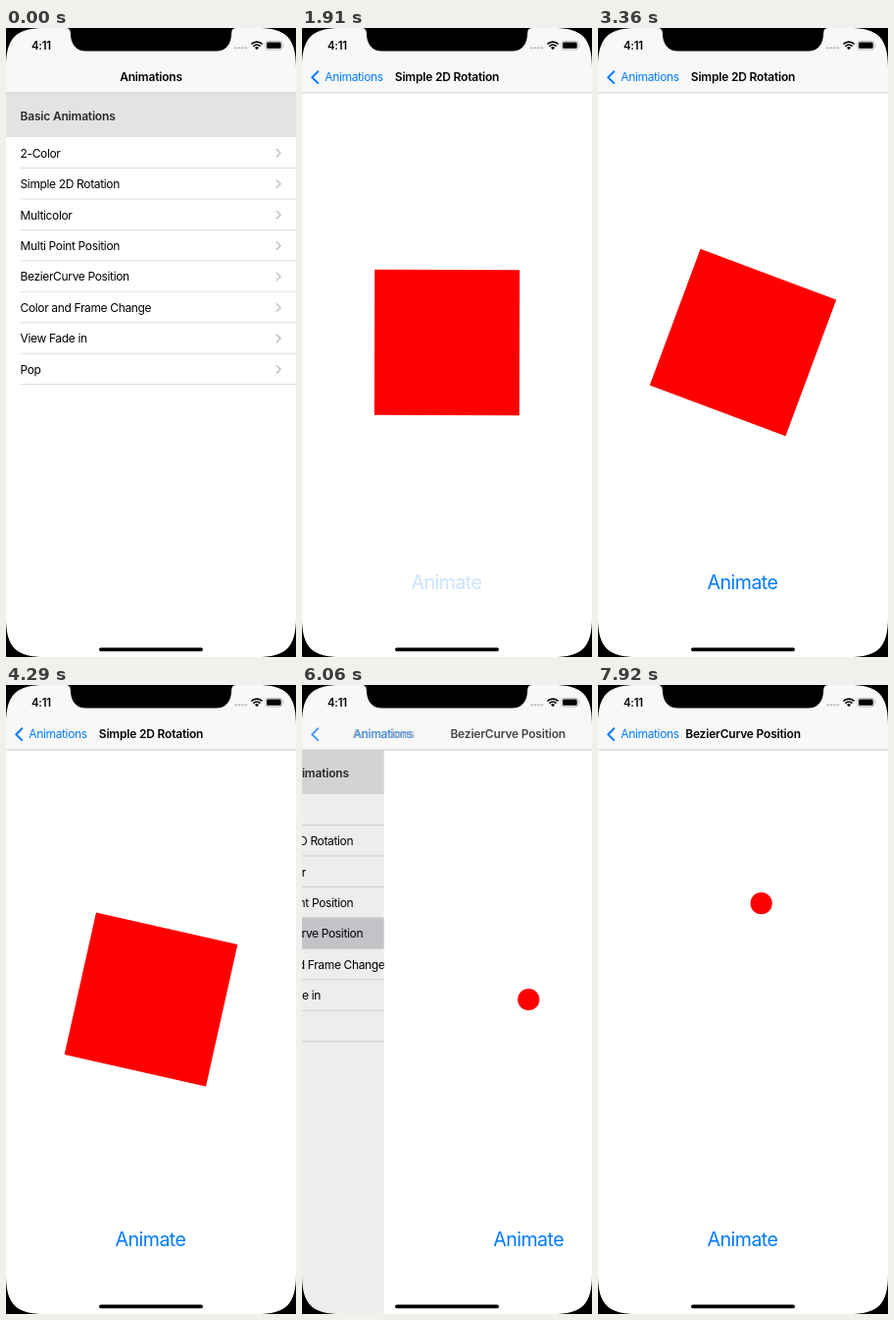
These frames come from a looping animation (296 by 640 pixels, 7990 ms). An HTML page:

```html
<!DOCTYPE html>
<html lang="en">
<head>
<meta charset="utf-8">
<title>Animations</title>
<style>
  html, body { margin: 0; width: 100%; height: 100%; overflow: hidden; background: #fff; }
  svg { display: block; width: 100vw; height: 100vh; }
  text { font: 12px Inter, Roboto, sans-serif; letter-spacing: -.35px; }
  .bold { font-weight: 600; letter-spacing: -.19px; }
  .mid { text-anchor: middle; }
  .blue { fill: #007aff; }
  .stroke { fill: none; stroke-linecap: round; stroke-linejoin: round; }
  #button { font-size: 19.6px; letter-spacing: -.55px; }
  #clock { font-size: 11.3px; }
</style>
</head>
<body>
<svg viewBox="0 0 296 640">
  <rect width="296" height="640" fill="#fff"/>
  <g id="list">
    <rect id="highlight" width="296" height="31.45" fill="#d1d1d6"/>
    <g id="rows"></g>
    <rect y="66" width="296" height="45" fill="#e3e3e3"/>
    <text class="bold" x="14.5" y="93.5" fill="#2b2b2b">Basic Animations</text>
  </g>
  <rect id="dim" width="296" height="640"/>
  <g id="page">
    <rect width="296" height="640" fill="#fff"/>
    <rect id="square" x="74" y="246" width="148" height="148" fill="red"/>
    <circle id="ball" r="11.1" fill="red"/>
    <text id="button" class="mid blue" x="147.5" y="571">Animate</text>
  </g>
  <rect width="296" height="66" fill="#f8f8f8"/>
  <rect y="65.5" width="296" height="1" fill="#d0d0d0"/>
  <text id="home" class="bold mid" y="54.3">Animations</text>
  <text id="back" class="mid blue" y="54.3">Animations</text>
  <path id="arrow" class="stroke" d="M16.3 44.3L10.3 50.2L16.3 56.1" stroke="#007aff" stroke-width="2"/>
  <text id="title" class="bold mid" y="54.3"></text>

  <text id="clock" class="bold" x="26" y="22">4:11</text>
  <g fill="#c4c4c4">
    <circle cx="234.5" cy="20.3" r="1.3"/><circle cx="238" cy="20.3" r="1.3"/>
    <circle cx="241.5" cy="20.3" r="1.3"/><circle cx="245" cy="20.3" r="1.3"/>
  </g>
  <g class="stroke" stroke="#000" stroke-width="1.7" style="stroke-linecap:butt">
    <path d="M250.4 16.4A8 8 0 0 1 261.6 16.4M252.5 18.6A5 5 0 0 1 259.5 18.6"/>
  </g>
  <path d="M256 22.2L254 20.1A2.8 2.8 0 0 1 258 20.1Z"/>
  <rect x="264.9" y="13.4" width="17" height="8.6" rx="2.4" fill="none" stroke="#aaa" stroke-width=".8"/>
  <rect x="266.1" y="14.6" width="14.6" height="6.2" rx="1.3"/>
  <path d="M283 16.2Q284.4 17.7 283 19.2Z" fill="#aaa"/>

  <path fill-rule="evenodd" d="M0 0H296V640H0ZM40 0C10 0 0 10 0 40V600C0 630 10 640 40 640H256C286 640 296 630 296 600V40C296 10 286 0 256 0Z"/>
  <path d="M61 0Q65.6 0 65.8 5C66 17 72 23.6 82 23.6H214C224 23.6 230 17 230.2 5Q230.4 0 235 0Z"/>
  <rect x="95" y="630.6" width="106" height="3.6" rx="1.8"/>
</svg>
<script>
const LOOP = 7990, ROW = 31.45, PUSH1 = 720, POP = 4410, PUSH2 = 5910;
const names = ['2-Color', 'Simple 2D Rotation', 'Multicolor', 'Multi Point Position',
  'BezierCurve Position', 'Color and Frame Change', 'View Fade in', 'Pop'];
const $ = id => document.getElementById(id);
const set = (id, attrs) => { for (const k in attrs) $(id).setAttribute(k, attrs[k]); };
const clamp = v => Math.min(1, Math.max(0, v));

$('rows').innerHTML = names.map((name, i) => {
  const y = 127.2 + ROW * i;
  return `<g><text x="14.5" y="${y + 4.4}">${name}</text>
    <path class="stroke" d="M276.3 ${y - 3.8}l3.8 3.8l-3.8 3.8" stroke="#c2c2c5" stroke-width="1.5"/>
    <rect x="14.5" y="${y + 14.8}" width="281.5" height="1" fill="#dedede"/></g>`;
}).join('');
const rows = [...$('rows').children];

const slide = u => u < 0 ? 0 : u > 540 ? 1 : 1 - Math.exp(-u / 119.5);

// cubic ease-in-out with handles at .42 and .58
function ease(x) {
  let lo = 0, hi = 1;
  for (let n = 0; n < 24; n++) {
    const s = (lo + hi) / 2, r = 1 - s;
    if (3 * r * r * s * .42 + 3 * r * s * s * .58 + s * s * s < x) lo = s; else hi = s;
  }
  return lo * lo * (3 - 2 * lo);
}

// underdamped spring, damping ratio .8, falling from 640 to 0
function spring(ms) {
  const w = Math.max(0, ms) * .01122;
  return 640 * Math.exp(-.8 * w) * (Math.cos(.6 * w) + 4 / 3 * Math.sin(.6 * w));
}

function ballAt(s) {
  const r = 1 - s, b1 = 3 * r * r * s, b2 = 3 * r * s * s;
  return { cx: 147.6 + b2 * 28.6 + s * s * s * 40, cy: 320 - b1 * 265 - b2 * 30 };
}

const buttonAlpha = (t, press, release) =>
  t < press ? 1 : .2 + .8 * clamp((t - release) / 400);

function draw(t) {
  const second = t >= PUSH2, popping = t >= POP && !second;
  const p = second ? slide(t - PUSH2) : popping ? 1 - slide(t - POP) : slide(t - PUSH1);
  const picked = second ? 4 : 1, off = 1 - p;

  set('list', { transform: `translate(${-88.8 * p})` });
  set('highlight', { y: 111 + ROW * picked, opacity: t >= PUSH1 && !popping ? 1 : 0 });
  rows.forEach((row, i) => {
    const dy = popping && t < 5650 ? spring(t - 4429 - 53 * i) : 0;
    row.setAttribute('transform', `translate(0 ${dy})`);
  });
  set('dim', { opacity: .1 * p });

  set('page', { transform: `translate(${296 * off})` });
  const turn = Math.max(0, t - 1881) / 2128;
  set('square', {
    opacity: second ? 0 : 1,
    transform: `rotate(${360 * ease(turn % 1)} 148 320)`
  });
  set('ball', { opacity: second ? 1 : 0, ...ballAt(clamp((t - 6720) / 2131)) });
  set('button', { opacity: second ? buttonAlpha(t, 6600, 6690) : buttonAlpha(t, 1760, 1910) });

  set('home', { x: 148 - 90 * p, opacity: off });
  set('back', { x: 53 + 105 * off, opacity: p });
  set('arrow', { opacity: p });
  set('title', { x: 148 + 220 * off, opacity: p });
  $('title').textContent = names[picked];
}

function tick() {
  draw(performance.now() % LOOP);
  requestAnimationFrame(tick);
}
tick();
</script>
</body>
</html>
```
